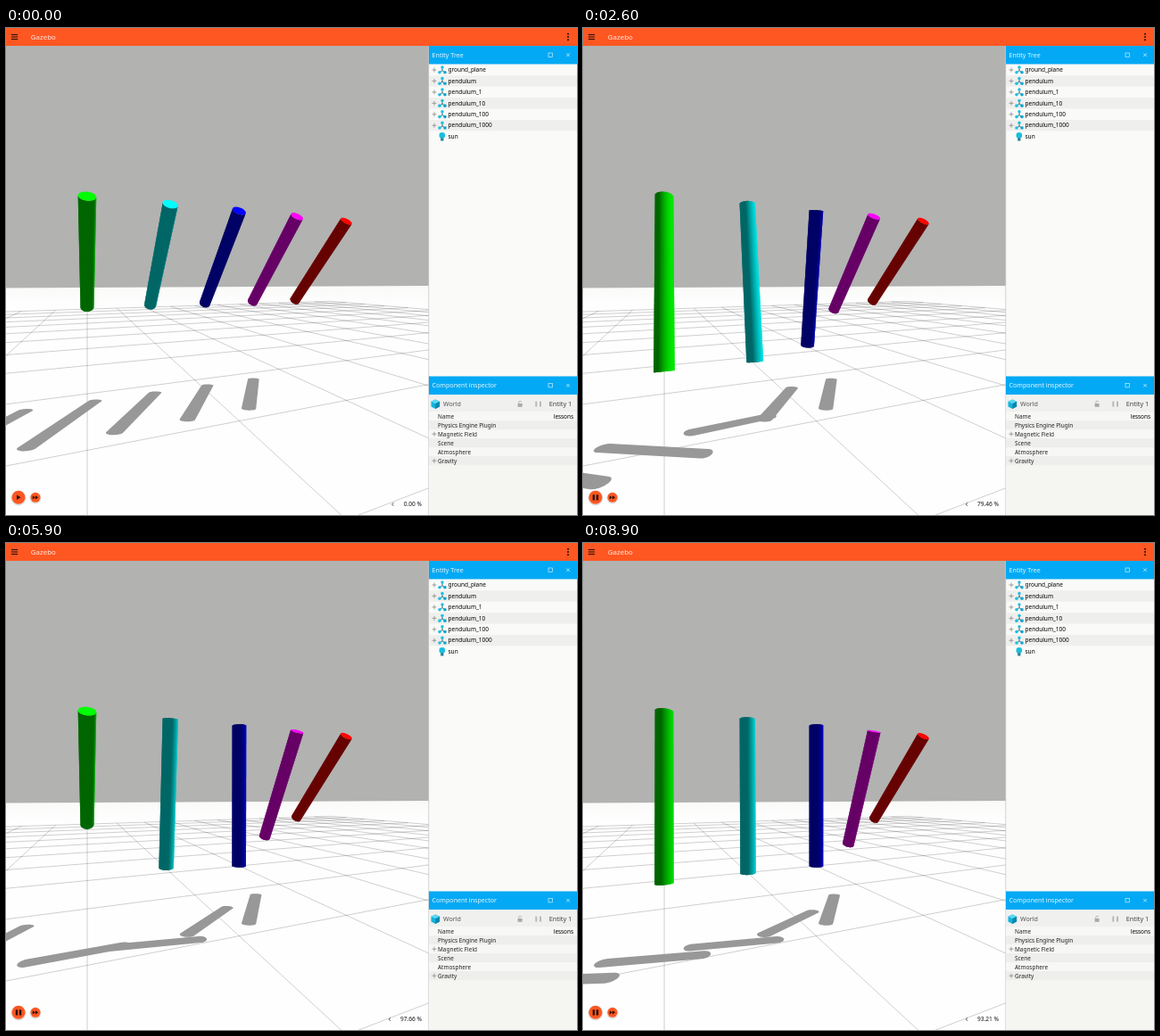
Write an HTML page with a canvas that moves like this. It is 640 px wide and 546 px high and loops after 9000 ms.

```html
<!DOCTYPE html>
<html lang="en">
<head>
<meta charset="utf-8">
<title>Damped pendulums</title>
<style>
html, body { margin: 0; width: 100%; height: 100%; overflow: hidden; background: #fafaf8; }
canvas, svg { position: absolute; left: 0; top: 0; display: block; }
text { font-family: "Noto Sans", "Open Sans", sans-serif; white-space: pre; }
</style>
</head>
<body>
<canvas id="view" width="474" height="546"></canvas>
<svg id="ui" width="640" height="546" viewBox="0 0 640 546"></svg>
<script>
const LOOP = 9000, STEP = 100;

// ---------- interface ----------
const ui = document.getElementById('ui');

function add(tag, attrs, content) {
  const el = document.createElementNS('http://www.w3.org/2000/svg', tag);
  for (const k in attrs) el.setAttribute(k, attrs[k]);
  if (content !== undefined) el.textContent = content;
  return ui.appendChild(el);
}
const rect = (x, y, width, height, fill) => add('rect', { x, y, width, height, fill });
const circle = (cx, cy, r, fill) => add('circle', { cx, cy, r, fill });
const shape = (d, fill) => add('path', { d, fill });
const line = (d, stroke, w = 1) => add('path', { d, stroke, 'stroke-width': w, fill: 'none' });
const label = (x, y, size, s, fill = '#000', anchor = 'start') =>
  add('text', { x, y, 'font-size': size, fill, 'text-anchor': anchor }, s);
const plus = y => line(`M477.5 ${y}h5M480 ${y - 2.5}v5`, '#8c8c8c', .8);

function header(y, title) {
  rect(474, y, 166, 20.5, '#03a9f4');
  const m = y + 10.2;
  label(477.6, m + 2.6, 7.1, title, '#e9f7fe');
  add('rect', { x: 608, y: m - 2.2, width: 4.4, height: 4.4, fill: 'none', stroke: '#e8f7ff', 'stroke-width': .6 });
  line(`M628.2 ${m - 1.8}l3.6 3.6m0 -3.6l-3.6 3.6`, '#e8f7ff', .7);
}

function modelIcon(y) {
  line(`M489 ${y - 3}v3.6l-3 2.4m3 -2.4l3 2.4`, '#2f5f6e', .9);
  circle(489, y - 3, 1.7, '#1cc0e4');
  circle(486, y + 2.8, 1.8, '#1cc0e4');
  circle(492, y + 2.8, 1.8, '#12a6cf');
}

function buildUi() {
  rect(0, 0, 640, 20, '#ff5722');
  for (const y of [7.5, 10, 12.5]) line(`M6 ${y}h7.2`, '#2a1008', 1.1);
  label(27.8, 12.8, 7.9, 'Gazebo', '#ffece5');
  for (const y of [6.8, 10, 13.2]) circle(630, y, 1.05, '#2a1008');

  rect(474, 20, 166, 526, '#fafaf8');
  rect(473.4, 20, .8, 526, '#c9c9c9');
  const rows = ['ground_plane', 'pendulum', 'pendulum_1', 'pendulum_10', 'pendulum_100', 'pendulum_1000', 'sun'];
  rows.forEach((name, i) => {
    const y = 47 + i * 12.45;
    if (i % 2) rect(474, y - 6.2, 166, 12.4, '#efefed');
    if (name === 'sun') {
      circle(488.8, y - 1.3, 3.3, '#18bfe0');
      rect(487.2, y + 1.5, 3.2, 3.3, '#2b7f95');
    } else {
      plus(y);
      modelIcon(y);
    }
    label(495.5, y + 2.2, 6.5, name);
  });
  header(20, 'Entity Tree');

  rect(474, 411, 166, 135, '#f5f5f2');
  rect(474, 411, 166, 19, '#f0f0ee');
  header(390.5, 'Component inspector');
  shape('M481.3 416.4l4.8 2.4v5.6l-4.8 2.6l-4.8 -2.6v-5.6z', '#12b4dc');
  shape('M481.3 416.4l4.8 2.4l-4.8 2.4l-4.8 -2.4z', '#5bd8f3');
  shape('M481.3 421.2l4.8 -2.4v5.6l-4.8 2.6z', '#0a86ad');
  label(490, 424.2, 7.1, 'World', '#555');
  rect(573.6, 421, 5, 3.8, '#a9a9a9');
  line('M574.8 421v-1.4a1.4 1.4 0 0 1 2.8 0', '#a9a9a9', .8);
  rect(593.3, 418.6, 2, 6, '#b9b9b9');
  rect(598, 418.6, 2, 6, '#b9b9b9');
  label(634.3, 424.2, 7.3, 'Entity 1', '#444', 'end');
  const parts = ['Name', 'Physics Engine Plugin', 'Magnetic Field', 'Scene', 'Atmosphere', 'Gravity'];
  parts.forEach((name, i) => {
    const y = 435.2 + i * 10;
    rect(474, y - 5, 166, 10, i % 2 ? '#eeeeec' : '#f7f7f5');
    if (i === 2 || i === 5) plus(y);
    label(484, y + 2.3, 6.45, name, '#222');
  });
  label(636, 437.5, 6.4, 'lessons', '#000', 'end');

  for (const [x, r] of [[14, 7.5], [33, 5.5]]) {
    circle(x, 527, r + 1, 'rgba(0,0,0,.13)');
    circle(x, 526.3, r, '#ff5722');
  }
  shape('M29.8 524.2l3.2 2.1l-3.2 2.1zM33 524.2l3.2 2.1l-3.2 2.1z', '#2a1008');
}

buildUi();
const playIcon = shape('M12 523.6l4.6 2.7l-4.6 2.7z', '#2a1008');
const pauseIcon = shape('M10.8 523.2h2.4v6.2h-2.4zM14.9 523.2h2.4v6.2h-2.4z', '#2a1008');
const arrow = line('M0 -1.9l-1.8 1.9l1.8 1.9', '#333', .8);
const rate = label(466, 536.2, 6.6, '', '#111', 'end');

// ---------- physics: rods of 2 m and 1 kg, hinged at one end ----------
const LENGTH = 2, RADIUS = .1, DT = .001;
const rods = [
  { damp: 0, color: [0, 255, 0] },
  { damp: 1, color: [0, 255, 255] },
  { damp: 10, color: [0, 5, 252] },
  { damp: 100, color: [255, 0, 255] },
  { damp: 1000, color: [255, 5, 0] }
];
for (const rod of rods) {
  const inertia = LENGTH * LENGTH / 3, pull = 9.8 / inertia;
  let a = Math.PI / 4, v = 0;
  rod.angles = [];
  for (let t = 0; t < 8.1; t += DT) {
    rod.angles.push(a);
    v = (v - pull * Math.sin(a) * DT) / (1 + rod.damp / inertia * DT);
    a += v * DT;
  }
}

// wall time (ms) -> simulated seconds, and the displayed real time factor
const simTable = [[720, 0], [1300, .5], [2600, 1.68], [4000, 3.05], [5900, 4.92], [7500, 6.5], [8900, 7.87]];
const rateTable = [[700, 96.84], [1300, 97.69], [2200, 84.3], [2600, 79.46], [3200, 89.12], [4000, 93.57],
  [5900, 97.66], [7500, 98.72], [8900, 93.21]];

function lookup(table, t) {
  if (t <= table[0][0]) return table[0][1];
  for (let i = 1; i < table.length; i++) {
    const [t0, a] = table[i - 1], [t1, b] = table[i];
    if (t <= t1) return a + (b - a) * (t - t0) / (t1 - t0);
  }
  return table[table.length - 1][1];
}

// ---------- scene: points are [right, away, up] in metres ----------
const ctx = document.getElementById('view').getContext('2d');
const FOCAL = 350.5, CX = 237.7, CY = 283.5, YAW = .3962, EYE = [0, 0, 2];
const CA = Math.cos(YAW), SA = Math.sin(YAW);
const SUN = [.5, -.1, .9].map(v => v / Math.hypot(.5, .1, .9));
const SIDES = 48;

const dot = (a, b) => a[0] * b[0] + a[1] * b[1] + a[2] * b[2];
const sub = (a, b) => a.map((v, i) => v - b[i]);
const mix = (a, b, k) => a.map((v, i) => v + (b[i] - v) * k);
const depth = p => p[1] * CA + p[0] * SA;
const facing = (n, p) => dot(n, sub(EYE, p)) > 0;
const onGround = p => [p[0] - p[2] * .5 / .9, p[1] + p[2] * .1 / .9, 0];

function project(p) {
  const s = FOCAL / depth(p);
  return [CX + s * (p[0] * CA - p[1] * SA), CY + s * (EYE[2] - p[2])];
}

function fillPoly(points, color) {
  ctx.beginPath();
  points.forEach(p => ctx.lineTo(...p));
  ctx.closePath();
  ctx.fillStyle = color;
  ctx.fill();
}

function hull(points) {
  const sorted = points.slice().sort((a, b) => a[0] - b[0] || a[1] - b[1]);
  const chain = list => {
    const out = [];
    for (const p of list) {
      for (let n = out.length; n > 1; n = out.length) {
        const [a, b] = out.slice(-2);
        if ((b[0] - a[0]) * (p[1] - a[1]) > (b[1] - a[1]) * (p[0] - a[0])) break;
        out.pop();
      }
      out.push(p);
    }
    return out;
  };
  return chain(sorted).concat(chain(sorted.reverse()));
}

function groundLine(a, b) {
  const near = .2, za = depth(a), zb = depth(b);
  if (za < near && zb < near) return;
  if (za < near) a = mix(a, b, (near - za) / (zb - za));
  else if (zb < near) b = mix(b, a, (near - zb) / (za - zb));
  ctx.moveTo(...project(a));
  ctx.lineTo(...project(b));
}

function drawGround() {
  ctx.fillStyle = '#b2b2b1';
  ctx.fillRect(0, 0, 474, 546);
  const tone = ctx.createLinearGradient(0, 290, 0, 312);
  tone.addColorStop(0, '#fafaf9');
  tone.addColorStop(1, '#fefefe');
  fillPoly([[0, 291.4], [474, 289], [474, 546], [0, 546]], tone);
  ctx.beginPath();
  for (let k = 0; k <= 40; k += 2) {
    groundLine([k - 18, -16, 0], [k - 18, 24, 0]);
    groundLine([-18, k - 16, 0], [22, k - 16, 0]);
  }
  ctx.strokeStyle = 'rgba(0,0,0,.21)';
  ctx.lineWidth = .9;
  ctx.stroke();
}

function makeRod(index, angle) {
  const s = Math.sin(angle), c = Math.cos(angle), axis = [0, s, -c];
  const hinge = [index, 4, 3], normals = [], top = [], bottom = [];
  const around = f => [Math.cos(f), Math.sin(f) * c, Math.sin(f) * s];
  for (let i = 0; i < SIDES; i++) {
    const f = i * 2 * Math.PI / SIDES;
    const p = around(f).map((v, k) => hinge[k] + RADIUS * v);
    normals.push(around(f + Math.PI / SIDES));
    top.push(p);
    bottom.push(p.map((v, k) => v + LENGTH * axis[k]));
  }
  return { axis, normals, top, bottom };
}

function shade(color, n) {
  const k = Math.min(1, .4 + .88 * Math.max(0, dot(n, SUN)));
  return `rgb(${color.map(v => Math.round(v * k))})`;
}

function drawRod({ axis, normals, top, bottom }, color) {
  const seen = i => facing(normals[i % SIDES], top[i % SIDES]);
  const upper = top.map(project), lower = bottom.map(project);
  let i = 0;
  while (seen(i) || !seen(i + 1)) i++;
  // each strip reaches under the next one, so no seam shows
  for (i++; seen(i); i++) {
    const ids = [i, i + 1];
    if (seen(i + 1)) ids.push(i + 2);
    const strip = ids.map(k => upper[k % SIDES]).concat(ids.reverse().map(k => lower[k % SIDES]));
    fillPoly(strip, shade(color, normals[i % SIDES]));
  }
  const up = axis.map(v => -v);
  if (facing(up, top[0])) fillPoly(upper, shade(color, up));
  if (facing(axis, bottom[0])) fillPoly(lower, shade(color, axis));
}

function drawScene(sim) {
  const step = Math.round(sim / DT);
  const meshes = rods.map((rod, i) => makeRod(i, rod.angles[step]));
  drawGround();
  for (const { top, bottom } of meshes)
    fillPoly(hull(top.concat(bottom).map(p => project(onGround(p)))), '#989898');
  meshes.forEach((mesh, i) => drawRod(mesh, rods[i].color));
}

// ---------- playback ----------
let shown = -1;
function render(t) {
  if (t === shown) return;
  shown = t;
  const running = t >= 400, moving = t >= 700;
  playIcon.style.display = running ? 'none' : '';
  pauseIcon.style.display = running ? '' : 'none';
  rate.textContent = (moving ? lookup(rateTable, t) : 0).toFixed(2) + ' %';
  arrow.setAttribute('transform', `translate(${moving ? 431 : 434.4} 534)`);
  drawScene(lookup(simTable, t));
}

const start = performance.now();
function tick() {
  const t = (performance.now() - start) % LOOP;
  render(Math.floor(t / STEP) * STEP);
  requestAnimationFrame(tick);
}
tick();
</script>
</body>
</html>
```
